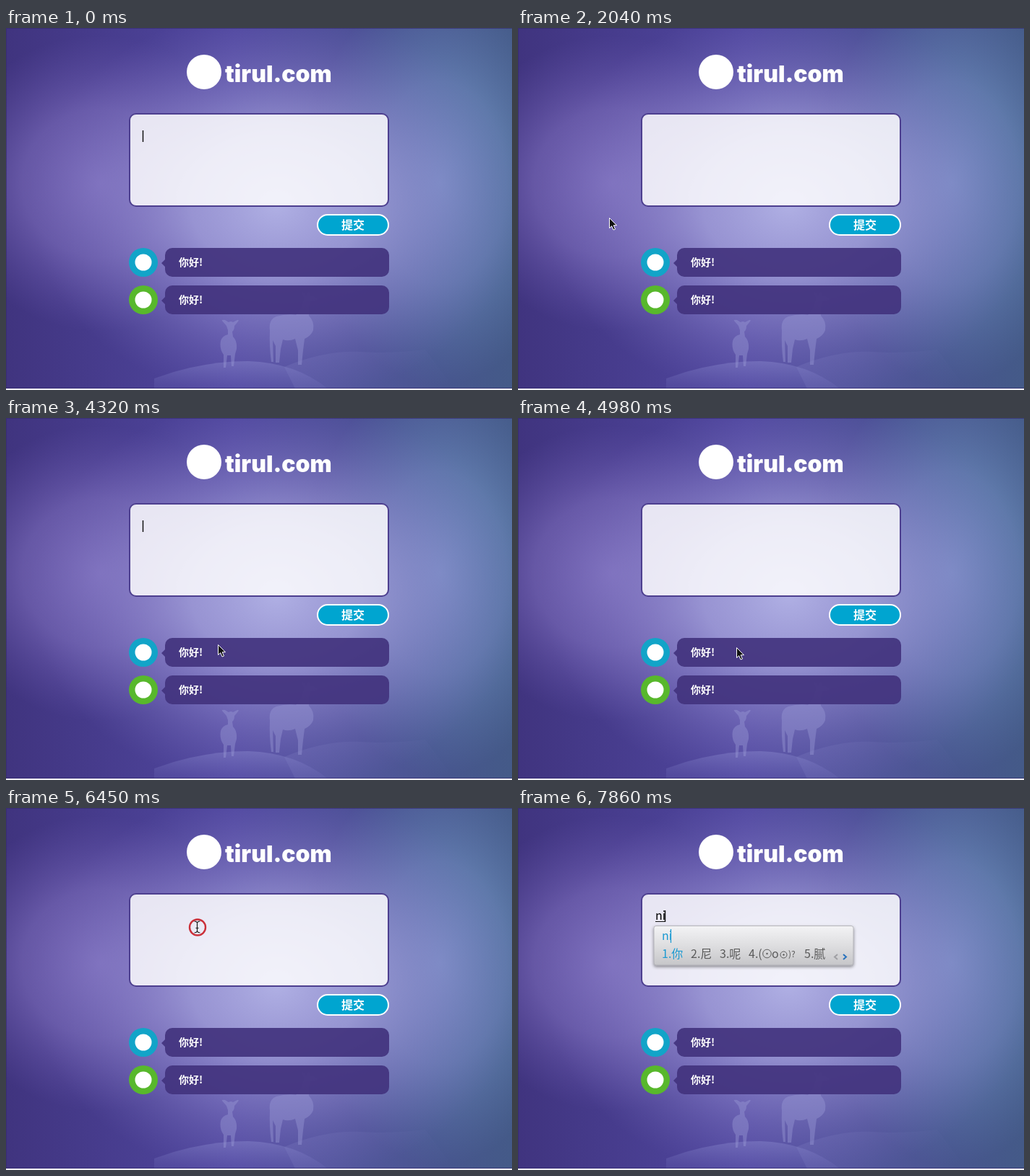
Recreate the animation shown at these times as an HTML page. Size 700 by 502 pixels, loop 8000 ms.

```html
<!DOCTYPE html>
<html lang="zh">
<head>
<meta charset="utf-8">
<title>留言板</title>
<style>
html, body { margin: 0; width: 100%; height: 100%; overflow: hidden; background: #fff; }
svg { display: block; width: 700px; height: 502px; font-family: "Noto Sans CJK SC", "Noto Sans CJK", sans-serif; }
.brand { font: 900 32px Inter, sans-serif; fill: #fff; }
.white { fill: #fff; font-weight: 700; }
.ime { font-size: 16px; fill: #5a5a5a; }
.pick { fill: #1b9ad2; }
</style>
</head>
<body>
<svg viewBox="0 0 700 502" xmlns="http://www.w3.org/2000/svg">
  <defs>
    <linearGradient id="base">
      <stop offset="0" stop-color="#40347f"/>
      <stop offset=".45" stop-color="#5047a0"/>
      <stop offset="1" stop-color="#445a88"/>
    </linearGradient>
    <radialGradient id="violet">
      <stop offset="0" stop-color="#8878c6" stop-opacity=".85"/>
      <stop offset=".5" stop-color="#7e6ebd" stop-opacity=".6"/>
      <stop offset="1" stop-color="#6b59b0" stop-opacity="0"/>
    </radialGradient>
    <radialGradient id="mid">
      <stop offset="0" stop-color="#b0b0e4"/>
      <stop offset=".35" stop-color="#a29fda" stop-opacity=".85"/>
      <stop offset=".65" stop-color="#8981c8" stop-opacity=".5"/>
      <stop offset="1" stop-color="#6e64b2" stop-opacity="0"/>
    </radialGradient>
    <radialGradient id="blue">
      <stop offset="0" stop-color="#7c9ccb" stop-opacity=".9"/>
      <stop offset=".5" stop-color="#7090c0" stop-opacity=".6"/>
      <stop offset="1" stop-color="#5f7fb0" stop-opacity="0"/>
    </radialGradient>
    <linearGradient id="hill" x2="0" y2="1">
      <stop offset="0" stop-color="#9090d2" stop-opacity=".4"/>
      <stop offset="1" stop-color="#7673c2" stop-opacity=".15"/>
    </linearGradient>
    <linearGradient id="slope">
      <stop offset="0" stop-color="#8c8ccc" stop-opacity=".2"/>
      <stop offset="1" stop-color="#8c8ccc" stop-opacity="0"/>
    </linearGradient>
    <linearGradient id="bar" x2="0" y2="1">
      <stop offset="0" stop-color="#f3f3f5"/>
      <stop offset=".5" stop-color="#dedee0"/>
      <stop offset="1" stop-color="#c6c6c9"/>
    </linearGradient>
    <filter id="shade" x="-5%" y="-20%" width="110%" height="150%">
      <feDropShadow dx="0" dy="2" stdDeviation="2" flood-opacity=".45"/>
    </filter>
    <clipPath id="scene"><path d="M0 0H700V500H0Z"/></clipPath>
  </defs>

  <g clip-path="url(#scene)">
    <path fill="url(#base)" d="M0 0H700V500H0Z"/>
    <ellipse cx="130" cy="215" rx="215" ry="205" fill="url(#violet)"/>
    <ellipse cx="600" cy="215" rx="185" ry="280" fill="url(#blue)"/>
    <ellipse cx="375" cy="245" rx="340" ry="275" fill="url(#mid)"/>
    <path fill="url(#slope)" d="M385 470Q440 447 490 449Q530 452 580 446L620 500H400Z"/>
    <path fill="url(#hill)" d="M205 486Q270 462 335 462Q400 464 445 500H205Z"/>
    <g fill="#9a9ad6" opacity=".42">
      <path d="M305 413L299 406Q298 404 303 405L308 408Q311 406 314 408L320 405Q323 404 321 407L316 413Q316 419 313 421L314 428Q320 434 319 445L317 452L315 469H312L311 454H306L304 471H301L301 453Q295 445 297 434Q299 427 307 425L307 419Z"/>
      <path d="M412 374L409 366Q412 366 415 371L419 365L420 370Q427 372 431 375Q430 379 422 379Q417 387 419 399Q427 407 425 419Q422 427 413 431L411 447L409 467H404L404 447L400 431Q391 435 383 432L380 445L378 464H373L373 441L369 433L370 463H367Q364 440 365 420Q363 404 374 400Q389 396 401 398Q410 391 412 374Z"/>
    </g>
    <path fill="none" stroke="#352c70" stroke-opacity=".7" d="M.5 500V.5H700M0 499.5H700"/>
  </g>

  <circle cx="274" cy="61" r="24" fill="#fff"/>
  <text class="brand" x="303" y="75">tirul.com</text>

  <rect x="171" y="119" width="358" height="128" rx="9" fill="#fff" fill-opacity=".83" stroke="#4d3f8f" stroke-width="2"/>
  <rect x="431" y="259" width="98" height="28" rx="14" fill="#00a5d0" stroke="#fff" stroke-width="2"/>
  <text class="white" x="480" y="279" font-size="16" text-anchor="middle">提交</text>
  <g id="posts"></g>

  <g id="typed">
    <text id="input" x="190" y="155" font-size="16"></text>
    <path id="under" stroke="#111" d=""/>
  </g>
  <path id="caret" stroke="#111" stroke-width="1.5"/>

  <g id="popup" class="ime">
    <rect x="188" y="163.500" width="276" height="54.500" rx="3" fill="url(#bar)" stroke="#a2a2a8" stroke-width=".7" filter="url(#shade)"/>
    <text id="spell" class="pick" x="199" y="183"></text>
    <path id="mark" stroke="#1b9ad2" stroke-width="1.200"/>
    <g id="words"></g>
    <g fill="none" stroke-width="2">
      <path stroke="#a0a0a4" d="M442 203L438 206.500L442 210"/>
      <path stroke="#2872bd" d="M450 203L454 206.500L450 210"/>
    </g>
  </g>

  <circle id="ring" cx="265" cy="165.500" fill="none" stroke="#c9232d"/>
  <g id="pointer">
    <path id="arrow" fill="#111" stroke="#fff" stroke-width="1" stroke-linejoin="round" d="M.5 .5V14.500L3.700 11.600L6 17L8.500 16L6.200 10.700H10.500Z"/>
    <path id="beam" fill="none" stroke="#1c1c1c" stroke-width="1.200" d="M-4.500 -8Q-1.500 -8 -.5 -6Q.5 -8 3.500 -8M-.5 -6V6M-4.500 8Q-1.500 8 -.5 6Q.5 8 3.500 8M-2.500 1.500H1.500"/>
  </g>
</svg>
<script>
const LOOP = 8000, STEP = 30;
const $ = id => document.getElementById(id);
const set = (id, attrs) => { for (const k in attrs) $(id).setAttribute(k, attrs[k]); };
const show = (id, on) => $(id).setAttribute("visibility", on ? "visible" : "hidden");

$("posts").innerHTML = [["#12a4c8", 305], ["#58b82c", 357]].map(([color, y]) => `
  <circle cx="190" cy="${y + 20}" r="20" fill="${color}"/>
  <circle cx="190" cy="${y + 20}" r="11.5" fill="#fff"/>
  <path fill="#43347e" fill-opacity=".92" d="M230 ${y}H520a10 10 0 0 1 10 10v20a10 10 0 0 1-10 10H230a10 10 0 0 1-10-10v-4l-5-5l5-5v-6a10 10 0 0 1 10-10Z"/>
  <text class="white" x="239" y="${y + 25}" font-size="14">你好!</text>`).join("");

const word = (x, text, cls = "") => `<text class="${cls}" x="${x}" y="208">${text}</text>`;
const eye = (x, y, r) => `<circle cx="${x}" cy="${y}" r="${r}" fill="none" stroke="#5a5a5a"/><circle cx="${x}" cy="${y}" r="1.2"/>`;
const face = word(319, "4.(") + eye(344.5, 202, 5.8) + word(351, "o") + eye(367.5, 203.5, 4.5) +
  `<text x="374" y="207" font-size="12">)?</text>`;
const WORDS = {
  n: word(199, "1.你", "pick") + word(239, "2.那") + word(279, "3.呢") + word(319, "4.能") + word(359, "5.年"),
  ni: word(199, "1.你", "pick") + word(239, "2.尼") + word(279, "3.呢") + face + word(396, "5.腻")
};

// time, x, y, rest
const PATH = [
  [780, -2, 446, 1], [1170, 150, 330], [1560, 338, 192, 1], [2040, 126, 263, 1], [2340, 126, 263, 1],
  [2700, 364, 196, 1], [3060, 224, 149], [3150, 221, 147, 1], [3510, 380, 215], [3870, 504, 274, 1],
  [4080, 504, 274, 1], [4320, 293, 314], [4560, 238, 319, 1], [4860, 300, 292, 1],
  [5160, 306, 366, 1], [5580, 267, 206], [5670, 266, 189], [5940, 265, 165, 1], [8000, 265, 165, 1]
];

function slope(i, axis) {
  if (PATH[i][3]) return 0;
  const a = PATH[i - 1], b = PATH[i + 1];
  return (b[axis] - a[axis]) / (b[0] - a[0]);
}

function along(t, axis) {
  let i = 0;
  while (i < PATH.length - 2 && t >= PATH[i + 1][0]) i++;
  const a = PATH[i], b = PATH[i + 1], d = b[0] - a[0], u = (t - a[0]) / d;
  const u2 = u * u, u3 = u2 * u;
  return (2 * u3 - 3 * u2 + 1) * a[axis] + (3 * u2 - 2 * u3) * b[axis] +
    ((u3 - 2 * u2 + u) * slope(i, axis) + (u3 - u2) * slope(i + 1, axis)) * d;
}

const BLINKS = [90, 540, 1050, 1590, 2040, 2490, 2970, 3150, 3600, 4080, 4560, 5010, 5460, 5880, 6360, 6840, 7290];
const DOWN = 6180, UP = 6330, TYPE = 7620, NEXT = 7860;
let current = "";

function drawTyping(t) {
  const typing = t >= TYPE;
  show("popup", typing);
  show("typed", typing);
  const lit = typing || BLINKS.filter(b => b <= t).length % 2 === 0;
  show("caret", lit);
  if (!typing) {
    set("caret", { d: "M189.5 142V158" });
    return;
  }
  const text = t >= NEXT ? "ni" : "n", w = text === "ni" ? 13.5 : 9.5;
  if (text !== current) {
    current = text;
    $("input").textContent = $("spell").textContent = text;
    $("words").innerHTML = WORDS[text];
  }
  set("caret", { d: `M${190 + w} 142V158` });
  set("under", { d: `M190 157.500H${190 + w}` });
  set("mark", { d: `M${198 + w} 168V187` });
  set("popup", { opacity: Math.min(1, (t - TYPE + STEP) / 90) });
}

function drawPointer(t) {
  const on = t >= PATH[0][0] && t < TYPE;
  show("pointer", on);
  if (on) {
    const x = Math.round(along(t, 1)), y = Math.round(along(t, 2));
    const inside = x > 170 && x < 530 && y > 118 && y < 248;
    set("pointer", { transform: `translate(${x} ${y})` });
    set("arrow", { display: inside ? "none" : "inline" });
    set("beam", { display: inside ? "inline" : "none" });
  }
  const pressed = t >= DOWN && t < UP, spread = t >= UP && t < 6840;
  show("ring", pressed || spread);
  if (pressed) set("ring", { r: 3.5, "stroke-width": 2, opacity: 1 });
  if (spread) {
    const u = (t - 6300) / 540;
    set("ring", { r: Math.max(1, 44 * u - 1.2), "stroke-width": 2.4, opacity: Math.min(1, 1.3 * (1 - u)) });
  }
}

function render(ms) {
  const t = Math.floor((ms % LOOP) / STEP) * STEP;
  drawTyping(t);
  drawPointer(t);
}

let start;
function tick(now) {
  if (start === undefined) start = now;
  render(Math.max(0, now - start));
  requestAnimationFrame(tick);
}
render(0);
requestAnimationFrame(tick);
</script>
</body>
</html>
```
